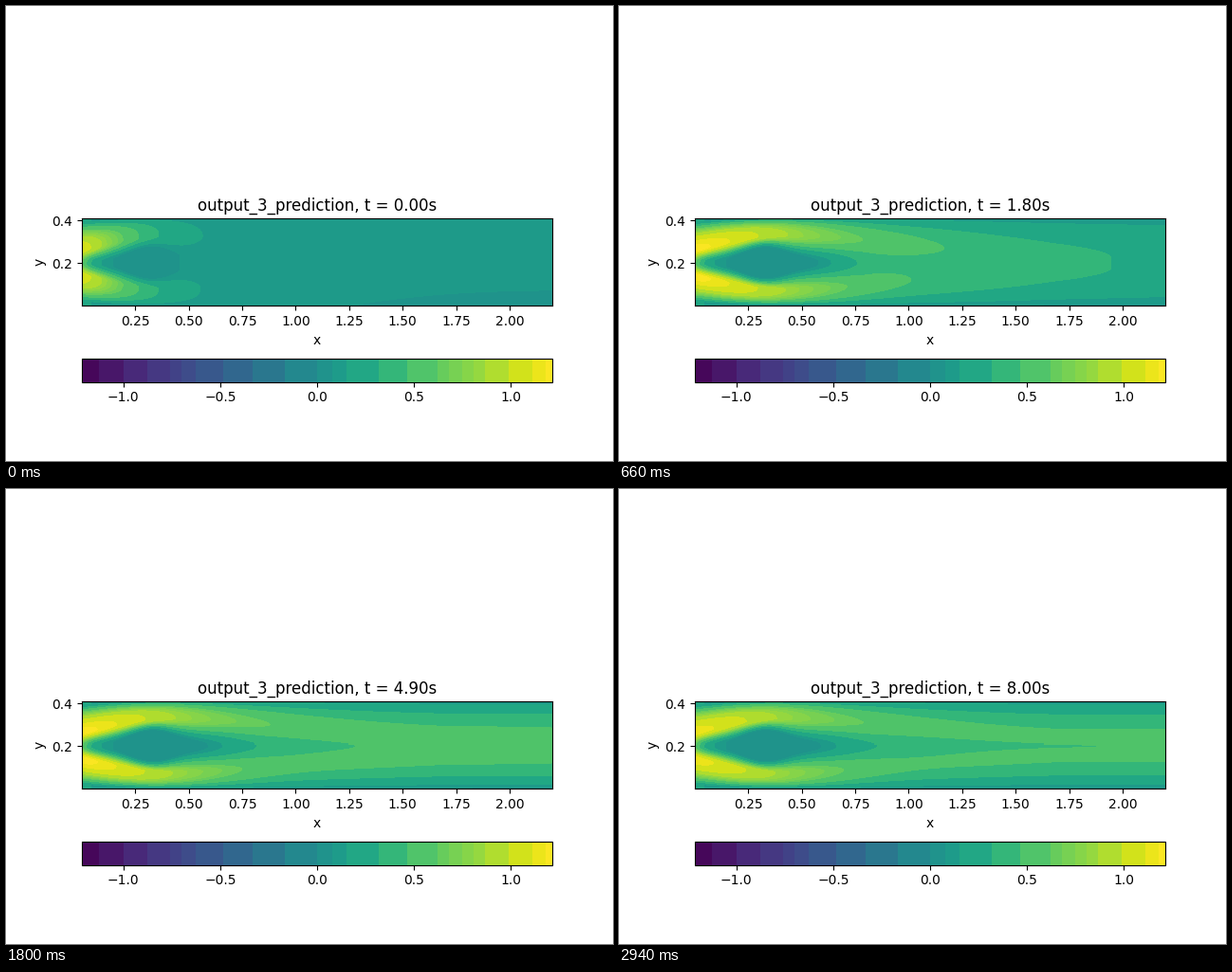
These frames come from a looping animation (640 by 480 pixels, 3 s). A matplotlib script:

```python
import numpy as np
import matplotlib.pyplot as plt
from matplotlib.animation import FuncAnimation
from matplotlib.colors import ListedColormap, Normalize

FRAMES, INTERVAL, T_END = 50, 60, 8.0
LENGTH, HEIGHT, VMAX = 2.2, 0.41, 1.2135
NX, NY = 496, 92

QUIET, CORE, JET = .085, .53, .68   # resting, developed and extra inlet speed

# Inner limits of the uneven colour bands
EDGES = [-1.127, -1.0, -.877, -.76, -.70, -.627, -.485, -.333, -.167, 0, .075,
         .152, .319, .465, .618, .681, .745, .804, .863, .985, 1.108, 1.176]

x = (np.arange(NX) + .5) / NX * LENGTH
s = ((np.arange(NY) + .5) / NY * 2 - 1)[:, None]   # -1 lower wall, 1 upper wall


def ease(v, a, b):
    u = np.clip((v - a) / (b - a), 0, 1)
    return u * u * (3 - 2 * u)


def bump(centre, width):
    return np.exp(-((x - centre) / width) ** 2)


# Distance from the slightly lowered centre line
d = np.abs(s + .03 * (1 - s ** 2))

# Wake edge, jet crest and outer reach of the jets across the channel
wake = .31 * bump(.33, .15)
crest_pos = np.maximum(.6 * bump(.4, np.where(x < .4, .447, .95)), .1)
reach = 1 - .12 * np.exp(-x / .12)
falloff = 2 + bump(.35, .3)

rise = ease(d, wake, crest_pos)
fall = np.clip((d - crest_pos) / (reach - crest_pos), 0, 1) ** falloff
wall = .08 + .17 * np.exp(-x / .05) - .02 * ease(x, .9, LENGTH) * (s < 0)
side = 1 - .1 * bump(.95, .35) * (s < 0)

crest_start = QUIET + .97 * np.exp(-(x / .28) ** 1.4)
crest_end = CORE + JET * np.exp(-(x / .55) ** 1.5)


def field(t):
    grown = 1 - np.exp(-(t / (.2 + x)) ** 1.7)
    fade = 1 - .05 * ease(t, 7, T_END)
    crest = (crest_start + (crest_end - crest_start) * grown) * fade * side
    core = (QUIET + (CORE - QUIET) * grown) * fade

    # The wake closes near x = 0.8 and leaves a trail that lengthens with time
    shift = .3 * np.exp(-t / .3)
    trail = 1 - .4 * np.exp(-np.maximum(x - .8, 0) / (.08 * t + .01)) * ease(t, 0, 3)
    mid = .03 + (core * trail - .03) * ease(x, .5 - shift, .85 - shift)
    mid = mid + .65 * np.exp(-x / .055)

    inner = mid + (crest - mid) * rise
    return inner + (wall - inner) * fall


def banded_cmap(n=992):
    limits = np.array([-VMAX, *EDGES, VMAX])
    centres = (limits[:-1] + limits[1:]) / 2
    v = ((np.arange(n) + .5) / n * 2 - 1) * VMAX
    band = np.searchsorted(limits, v) - 1
    return ListedColormap(plt.get_cmap("viridis")((centres[band] / VMAX + 1) / 2))


fig, ax = plt.subplots(figsize=(6.4, 4.8), dpi=100)
img = ax.imshow(field(0), origin="lower", extent=(0, LENGTH, 0, HEIGHT),
                cmap=banded_cmap(), norm=Normalize(-VMAX, VMAX),
                interpolation="nearest", aspect="equal")
ax.set_xticks(np.arange(.25, 2.01, .25))
ax.set_yticks([.2, .4])
ax.xaxis.set_major_formatter("{x:.2f}")
ax.set_xlabel("x")
ax.set_ylabel("y")
title = ax.set_title("")
fig.colorbar(img, ax=ax, orientation="horizontal", ticks=[-1, -.5, 0, .5, 1])


def update(i):
    t = T_END * i / (FRAMES - 1)
    img.set_data(field(t))
    title.set_text(f"output_3_prediction, t = {t:.2f}s")
    return img, title


anim = FuncAnimation(fig, update, frames=FRAMES, interval=INTERVAL,
                     repeat=True, repeat_delay=0, blit=False)
plt.show()
```
